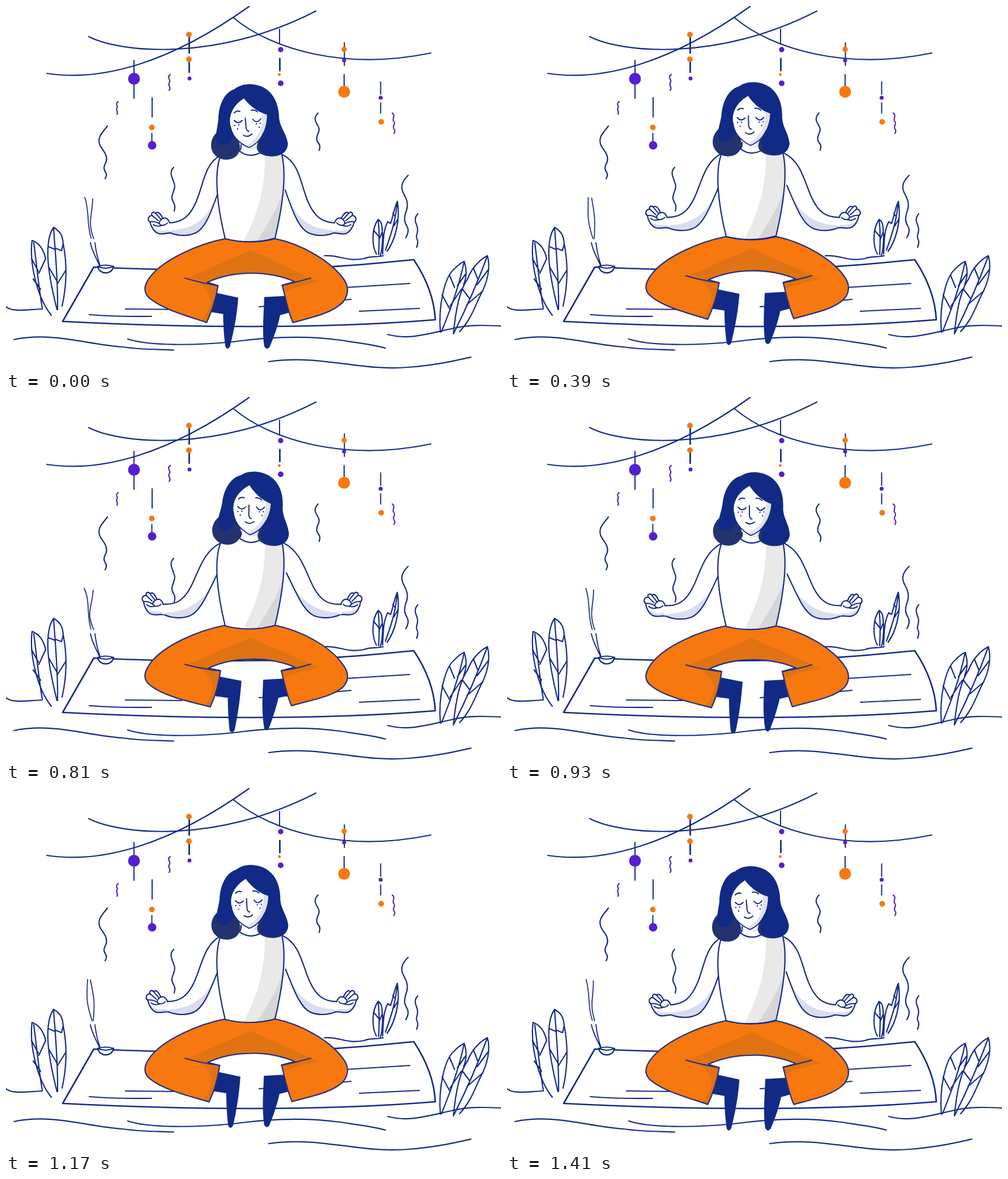
These frames come from a looping animation (874x641 px, 1440 ms). An HTML page with a canvas:

```html
<!DOCTYPE html>
<html lang="en">
<head>
<meta charset="utf-8">
<title>Meditation</title>
<style>
html, body { margin: 0; width: 100%; height: 100%; overflow: hidden; background: #fff; }
canvas { display: block; width: 874px; height: 641px; }
</style>
</head>
<body>
<canvas id="stage" width="874" height="641"></canvas>
<script>
const ctx = document.getElementById('stage').getContext('2d');
const LOOP = 1440, STEP = 30;
const NAVY = '#12298a', HAIR = '#112a86', SLATE = '#22336f';
const ORANGE = '#f7780f', RUST = '#e07313', PURPLE = '#541fd2';
ctx.lineCap = ctx.lineJoin = 'round';

const line = (d, width = 2.2, color = NAVY) => {
  ctx.strokeStyle = color;
  ctx.lineWidth = width;
  ctx.stroke(new Path2D(d));
};
const fill = (d, color) => {
  ctx.fillStyle = color;
  ctx.fill(new Path2D(d));
};
const shape = (d, color, width) => { fill(d, color); line(d, width); };
const dot = (x, y, r, color) => {
  ctx.fillStyle = color;
  ctx.beginPath();
  ctx.arc(x, y, r, 0, 7);
  ctx.fill();
};
const scoped = draw => { ctx.save(); draw(); ctx.restore(); };

// Blends two paths with the same commands; x and y may run on separate phases.
function morph(low, high, kx, ky = kx) {
  const ends = high.match(/-?[\d.]+/g);
  let i = 0;
  return low.replace(/-?[\d.]+/g, n => {
    const k = i % 2 ? ky : kx;
    return +n + (ends[i++] - n) * k;
  });
}

// 0..1 wave that reaches 1 at the given time
const wave = (t, peak, period = LOOP) => 0.5 + 0.5 * Math.cos((t - peak) / period * 2 * Math.PI);

function drawGarlands() {
  line('M72 119C170 134 290 100 429 1');
  line('M146 54C200 82 370 100 547 9');
  line('M402 21C470 78 600 114 750 83');
  const cord = (x, y1, y2, w = 2, c = NAVY) => line(`M${x} ${y1}V${y2}`, w, c);
  cord(226, 96, 163);
  dot(226, 128.5, 10.5, PURPLE);
  cord(258, 162, 196);
  dot(257.5, 214.5, 5, ORANGE);
  cord(257.5, 225, 240);
  dot(258, 246, 7.5, PURPLE);
  cord(323.5, 55, 83, 2.8);
  cord(323.5, 98, 117, 2.8);
  dot(323, 50.5, 5, ORANGE);
  dot(323, 94, 5, ORANGE);
  dot(324, 128, 3.5, PURPLE);
  cord(483, 41, 67);
  dot(485, 77, 4.7, PURPLE);
  cord(483.5, 93, 114, 2.8);
  dot(482.5, 121, 2.5, ORANGE);
  dot(485, 136.5, 5, PURPLE);
  cord(597.5, 65, 105, 2, '#2b2233');
  dot(597, 76.5, 4.7, ORANGE);
  dot(597, 96, 3.6, PURPLE);
  cord(597, 121, 141);
  dot(597, 151.5, 10.5, ORANGE);
  cord(661.5, 134, 156);
  dot(661.5, 162, 3.6, PURPLE);
  cord(661.5, 171, 189);
  dot(662.5, 204.5, 5, ORANGE);
}

function drawSquiggles() {
  line('M290 121C282 127 293 130 288 136C285 141 293 143 288 149', 2.2, PURPLE);
  line('M198 169C191 174 199 176 196 180C193 184 199 186 196 191', 2.2, PURPLE);
  line('M682 189C688 193 682 198 684 203C690 208 681 212 685 217Q688 220 685 225', 2.2, PURPLE);
  line('M179 212C170 224 160 232 166 246C171 256 180 262 177 275C172 284 172 288 176 294Q179 298 175 305');
  line('M296 285C287 294 294 303 296 311C302 322 292 330 293 340C294 347 301 350 297 362');
  line('M551 189C541 199 548 206 551 212C557 222 546 228 549 237C550 243 557 243 553 255');
  line('M710 299C700 309 696 318 701 329C707 340 712 350 706 364C702 377 704 382 708 389Q713 397 706 409');
  line('M727 367C719 376 724 383 726 390C729 400 723 404 725 410Q729 416 725 426');
}

function drawGround() {
  line('M0 531C12 541 36 536 64 535');
  line('M14 589C80 575 140 597 205 602C240 607 265 606 296 607.5');
  line('M215 588C250 600 330 600 400 593C480 582 540 583 590 590C620 595 645 597 670 604');
  line('M464 628C560 615 620 645 710 638C760 634 790 627 821 620');
  line('M674 580C710 590 740 580 790 569C820 562 850 564 874 565');
  line('M562 441C590 439 600 452 632 446C645 441 655 444 666 441');
}

function drawPlants() {
  line('M80 546C55 515 41 455 46 414C57 418 66 428 70 446');
  line('M49 418C54 455 58 500 64 533M45 446L57 468M48 482L61 500M70 446L58 472');
  line('M90 536C81 500 75 470 74 445C73 420 76 402 84 391C96 398 100 405 101 420C108 455 108 490 99 530');
  line('M84 391C86 425 92 480 91 536M75 425L87 430M101 420L98 432L88 428M106 466L91 490M76 462L90 486');
  line('M767 576C763 530 774 478 792 464Q800 455 809 451C814 466 813 480 808 492');
  line('M809 451C800 495 785 535 769 575M783 475L792 497M811 474L797 494M770 510L783 534M804 500L784 530');
  line('M790 579C794 535 802 500 815 482C822 463 836 448 850 441C856 462 850 488 838 510C828 530 822 552 801 575');
  line('M850 441C834 485 812 535 791 577M825 462L833 482M852 465L832 492M806 500L818 516M842 503L814 527');
  line('M654 438C646 424 645 394 657 377C666 382 663 394 665 402C665 420 664 432 661 440');
  line('M657 377C660 400 659 420 658 439M649 396L659 408M664 400L659 412');
  line('M665 438C666 415 666 396 674 381L679 384C684 370 685 358 691 345C697 380 686 415 673 433');
  line('M691 345C688 375 684 392 670 431M683 366L687 372M692 376L685 388');
}

function drawMat() {
  shape('M155 461C260 466 340 467 430 465.5C540 465 640 456 720 448C740 478 756 515 758 554C660 562 550 566 430 566C300 566 200 562 100 557Z', '#fff', 2.7);
  line('M147 545Q200 549 257 548M211 535L310 536M447 531Q530 526 609 518M600 497L713 490M624 539L730 534');
}

function drawIncense(k) {
  line(morph('M138 338C149 360 142 385 150 410', 'M144 338C142 372 142 380 152 411', k), 1.7);
  line(morph('M154 341C151 375 141 380 155 411', 'M149 339C156 372 157 380 154 411', k), 1.7);
  line('M149 418C152 434 160 446 165 458M157 418Q160 442 166 458', 1.9);
  shape('M162 460C165 475 187 475 190 460Z', '#fff', 2.4);
  shape('M162 460Q176 455 190 460Q176 466 162 460Z', '#fff', 2);
}

function drawLegs(kx, ky) {
  fill(morph(
    'M368 506L409 515C407 545 401 575 394 601Q389.5 609 386 601C383 580 382 560 382 544L358 540Z',
    'M375 493L416 501C414 530 410 560 404 588Q399 596 395 588C393 568 392 546 392 531L370 528Z', kx, ky), HAIR);
  fill(morph(
    'M456 514L492 512L502 541L484 546C480 565 473 585 466 601Q461 609 456 601C452 575 455 545 456 514Z',
    'M454 499L490 497L498 527L481 531C476 552 470 570 464 585Q460 592 456 585C451 555 453 530 454 499Z', ky), HAIR);
}

function drawPants(kx, ky) {
  const blend = (low, high) => morph(low, high, kx, ky);
  const outline = blend(
    'M387 411C340 420 278 448 255 478C242 494 242 508 256 518C280 537 325 549 353 559C362 540 370 515 373.5 494L355 488C380 477 405 472 432 472C460 471 490 478 510 487L488 493C494 515 498 540 507 559C540 550 575 543 595 523C605 510 605 497 598 485C575 450 520 420 475 411Q432 422 387 411Z',
    'M387 403C340 412 278 438 254 471C242 488 242 500 256 510C280 529 330 539 361 547C370 528 376 505 379 483L357 479C380 468 405 463 432 463C460 462 490 468 510 477L486 483C491 505 496 527 504 545C540 534 575 530 595 512C605 502 605 488 598 477C575 440 520 412 475 403Q432 414 387 403Z');
  fill(outline, ORANGE);
  scoped(() => {
    ctx.clip(new Path2D(outline));
    fill(blend(
      'M432 431L322 480L357 489C400 470 460 470 510 488L553 487Z',
      'M432 425L322 472L357 480C400 461 460 461 510 478L553 478Z'), RUST);
    fill(blend(
      'M336 486L374 494C370 515 362 540 353 559L343 556C368 530 364 503 336 486Z',
      'M336 477L379 483C376 505 370 528 361 547L349 544C374 520 370 495 336 477Z'), RUST);
    fill(blend(
      'M488 493L538 481L553 487C530 491 508 497 490 506Z',
      'M486 483L538 472L553 478C530 482 508 488 488 497Z'), RUST);
  });
  line(outline, 2.3, '#27317f');
  line(blend(
    'M316 480.5Q340 488 373.5 494M488 493.5Q515 487 538 480.5',
    'M316 472Q340 479 379 483.5M486 483.5Q515 479 538 471.5'), 2.2, '#27317f');
}

function drawArm(k) {
  const low = 'C300 405 318 408 334 401C352 393 362 365 376 325';
  const high = 'C290 389 308 392 324 386C344 378 356 345 374 310';
  const under = morph('M289 400' + low, 'M279 384' + high, k);
  const upper = morph(
    'M380 263C350 278 349 315 336 345C325 371 312 382 288 383',
    'M380 257C348 272 340 308 326 335C314 358 300 367 277 365', k);
  fill(upper + under.replace('M', 'L') + 'Z', '#fff');
  fill(under + morph('C364 357 348 393 292 396', 'C361 342 336 379 282 380', k) + 'Z', '#dadded');
  line(upper);
  line(under);
  scoped(() => {
    ctx.translate(275 - 12 * k, 385 - 18.5 * k);
    ctx.rotate(0.1 * k);
    ctx.translate(-275, -385);
    const palm = 'M289 383C287 377 283 373 277 375C274 369 269 361 264 366C260 362 255 366 258 370C251 370 249 378 254 381C256 390 262 400 270 402C278 404 284 400 290 401';
    fill(palm, '#fff');
    fill('M258 390C268 399 280 396 289 396L290 401C278 404 264 404 258 390Z', '#dadded');
    line(palm);
    line('M258 370L269 379M264 366L274 377M254 381Q264 380 270 384M277 375C272 378 269 382 272 386C276 389 283 386 285 383M260 386Q267 391 276 387', 2);
  });
}

function drawTorso(k) {
  ctx.translate(0, -7 * k);
  const shirt = 'M379 264L412 256Q430 270 451 258L487 262C496 300 488 355 475 410Q432 422 387 411C372 350 367 295 379 264Z';
  fill('M415 238H448V260Q430 270 415 258Z', '#fff');
  fill('M418 246Q434 256 448 244V252Q434 256 418 246Z', '#e2e4ea');
  fill(shirt, '#fff');
  scoped(() => {
    ctx.clip(new Path2D(shirt));
    fill('M457 255C459 318 446 366 418 418H480L497 262Z', '#e9e9e9');
    fill('M492 318C484 350 466 380 441 418H478Z', '#d6d6d7');
  });
  line('M415 245Q416 252 412 256Q430 270 451 258');
  line('M379 264C367 295 372 350 387 411Q432 422 475 410C488 355 496 300 487 262');
}

function drawHead(k) {
  ctx.translate(430 + 1.5 * k, 250 - 6.8 * k);
  ctx.rotate(0.1 * k);
  ctx.translate(-430, -250);
  fill('M374 222C360 232 358 254 370 264C380 275 404 274 411 259C416 248 412 236 402 228Z', SLATE);
  fill('M456 222C442 240 438 254 450 261C466 270 498 267 497.5 242L482 215Z', SLATE);
  fill('M431 138C418 138 409 142 403 147C384 153 375 178 375 200C373 218 368 232 372 240C380 250 394 246 400 232L429 242L456 222C448 238 444 250 453 260C470 268 499 265 497.5 241C494 222 482 213 482 193C480 163 464 139 431 138Z', HAIR);
  fill('M420 163C408 171 398 182 395.5 198C394 218 404 239 429 250C448 241 461 218 460.5 192C444 187 430 176 420 163Z', '#fff');
  fill('M452 189C455 215 444 236 424 247L429 250C448 241 461 218 460.5 192Z', '#dfe2e8');
  line('M396 212C399 232 413 243 429 250C441 245 450 235 455 223', 1.8);
  line('M403 202Q410 210 417 202M436 200Q443 209 450 199', 2);
  line('M403 189Q407 184 413 186M433 184Q440 183 444 187', 2);
  line('M422.5 198L424 216Q426 222 429 221', 2);
  line('M419 228Q427 233 434 226', 2);
  for (const [x, y] of [[404, 211], [409, 217], [411, 210], [442, 208], [447, 214], [449, 207]]) dot(x, y, 1.2, NAVY);
}

function render(now) {
  const t = Math.floor(now % LOOP / STEP) * STEP;
  const lift = wave(t, 728), legs = wave(t, 755), sway = wave(t, 900);
  ctx.fillStyle = '#fff';
  ctx.fillRect(0, 0, 874, 641);
  drawGarlands();
  drawSquiggles();
  drawGround();
  drawPlants();
  drawMat();
  drawIncense(wave(t, 460, LOOP / 2));
  drawLegs(sway, legs);
  drawPants(sway, legs);
  drawArm(lift);
  scoped(() => {
    ctx.translate(869, 0);
    ctx.scale(-1, 1);
    drawArm(lift);
  });
  scoped(() => drawTorso(lift));
  scoped(() => drawHead(lift));
  requestAnimationFrame(render);
}
render(performance.now());
</script>
</body>
</html>
```
